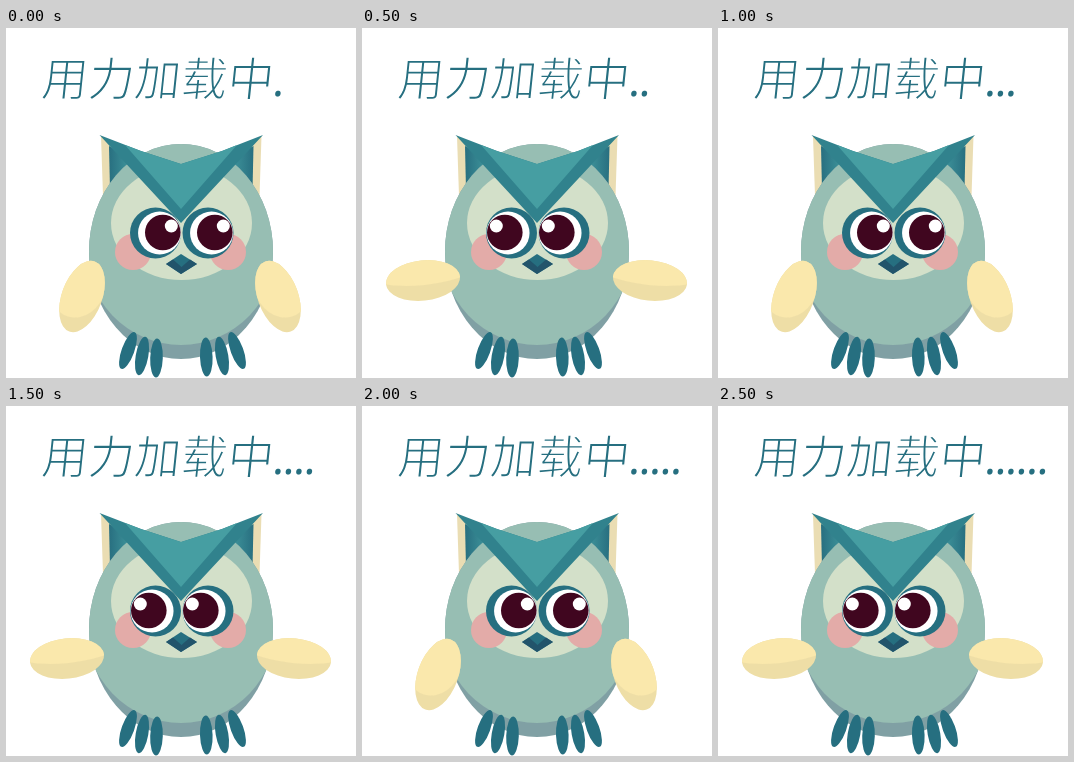
Animation of 350 by 350 pixels, one loop 3 s. Source, as an HTML page:

```html
<!DOCTYPE html>
<html lang="zh-CN">
<head>
<meta charset="utf-8">
<title>用力加载中</title>
<style>
  html, body { margin: 0; width: 100%; height: 100%; overflow: hidden; background: #fff; }
  svg { display: block; width: 100vw; height: 100vh; }
  .label { font: 400 46.5px "Noto Sans CJK SC", "Noto Sans CJK", sans-serif; stroke: #fff; stroke-width: 1.5px; }
  .dots { font: 400 44px "Noto Sans", sans-serif; }
</style>
</head>
<body>
<svg viewBox="0 0 350 350" xmlns="http://www.w3.org/2000/svg">
  <defs>
    <clipPath id="bodyClip"><ellipse cx="175" cy="223.5" rx="92" ry="107.5"/></clipPath>
    <clipPath id="downClip"><ellipse cx="76" cy="268.5" rx="20.2" ry="37.2" transform="rotate(20 76 268.5)"/></clipPath>
    <clipPath id="upClip"><ellipse cx="61" cy="252.5" rx="37.2" ry="20.2" transform="rotate(-6 61 252.5)"/></clipPath>
    <linearGradient id="earShade">
      <stop offset="0" stop-color="#286f80"/>
      <stop offset=".6" stop-color="#439ba0"/>
    </linearGradient>
    <g id="ear">
      <path d="M95 108L97 168L140 140Z" fill="#eaddb3"/>
      <path d="M103 118L104 162L145 140Z" fill="url(#earShade)"/>
    </g>
    <g id="wingDown" clip-path="url(#downClip)">
      <rect x="20" y="220" width="100" height="100" fill="#eedea6"/>
      <ellipse cx="72" cy="254" rx="29" ry="36" transform="rotate(15 72 254)" fill="#fae8ac"/>
    </g>
    <g id="wingUp" clip-path="url(#upClip)">
      <rect x="20" y="220" width="100" height="100" fill="#eedea6"/>
      <ellipse cx="61" cy="238" rx="60" ry="19" transform="rotate(-6 61 238)" fill="#fae8ac"/>
    </g>
    <g id="eye">
      <circle cy="205" r="21.5" fill="#fff"/>
    </g>
  </defs>

  <g fill="#266f80" transform="translate(0 51) skewX(-6) translate(0 -51)">
    <text class="label" x="36" y="68.5">用力加载中</text>
    <text class="dots" id="dots" y="68.5"></text>
  </g>

  <use href="#ear"/>
  <use href="#ear" transform="translate(350.5) scale(-1 1)"/>

  <g clip-path="url(#bodyClip)">
    <rect x="80" y="110" width="190" height="225" fill="#80a0a4"/>
    <ellipse cx="175" cy="216" rx="97" ry="101" fill="#97beb3"/>
  </g>
  <ellipse cx="175.5" cy="195" rx="70.5" ry="57" fill="#d3e0c9"/>
  <path d="M93.500 107L135 123L175 136L216 123L257 107L175 195Z" fill="#31828d"/>
  <path d="M119 117L135 123L175 136L216 123L231 117L175 181Z" fill="#469ea2"/>

  <g fill="#e3aba8">
    <circle cx="127" cy="224" r="18"/>
    <circle cx="222" cy="224" r="18"/>
  </g>
  <g fill="#266f80">
    <circle cx="149.500" cy="205" r="25.500"/>
    <circle cx="202" cy="205" r="25.500"/>
  </g>
  <g id="eyes"></g>

  <path d="M160 236L175 226L191 236L175 246Z" fill="#266f80"/>
  <path d="M160 236L167 231.500L175.500 239L184 231.500L191 236L175 246Z" fill="#22546b"/>

  <g id="feet" fill="#266f80"></g>
  <g id="wingsDown">
    <use href="#wingDown"/>
    <use href="#wingDown" transform="translate(348) scale(-1 1)"/>
  </g>
  <g id="wingsUp">
    <use href="#wingUp"/>
    <use href="#wingUp" transform="translate(349) scale(-1 1)"/>
  </g>
</svg>
<script>
  const STEP = 500, STEPS = 6;
  const $ = id => document.getElementById(id);

  const toes = [
    [122, 322.5, 20], [136, 328, 10], [150.5, 330, 2],
    [200.3, 329, -2], [216, 328, -10], [231, 322.5, -20]
  ];
  $('feet').innerHTML = toes.map(([x, y, turn]) =>
    `<ellipse cx="${x}" cy="${y}" rx="6.3" ry="19.5" transform="rotate(${turn} ${x} ${y})"/>`
  ).join('');

  const disc = (x, y, r, fill) => `<circle cx="${x}" cy="${y}" r="${r}" fill="${fill}"/>`;

  // look is 1 for right, -1 for left
  const eye = (x, look) =>
    disc(x + 3.75 * look, 205, 21.5, '#fff') +
    disc(x + 7 * look, 204.5, 17.8, '#40061f') +
    disc(x + 15.5 * look, 198, 6.5, '#fff');

  let shown = -1;

  function draw(time) {
    const step = Math.floor(time / STEP) % STEPS;
    if (step === shown) return;
    shown = step;
    const raised = step % 2 === 1;
    const look = raised ? -1 : 1;
    $('eyes').innerHTML = eye(149.8, look) + eye(201.8, look);
    $('wingsUp').style.display = raised ? '' : 'none';
    $('wingsDown').style.display = raised ? 'none' : '';
    $('dots').textContent = '.'.repeat(step + 1);
    $('dots').setAttribute('x', Array.from({ length: step + 1 }, (_, i) => 267.7 + 10.5 * i).join(' '));
  }

  const start = performance.now();
  function loop() {
    draw(performance.now() - start);
    requestAnimationFrame(loop);
  }
  loop();
</script>
</body>
</html>
```
